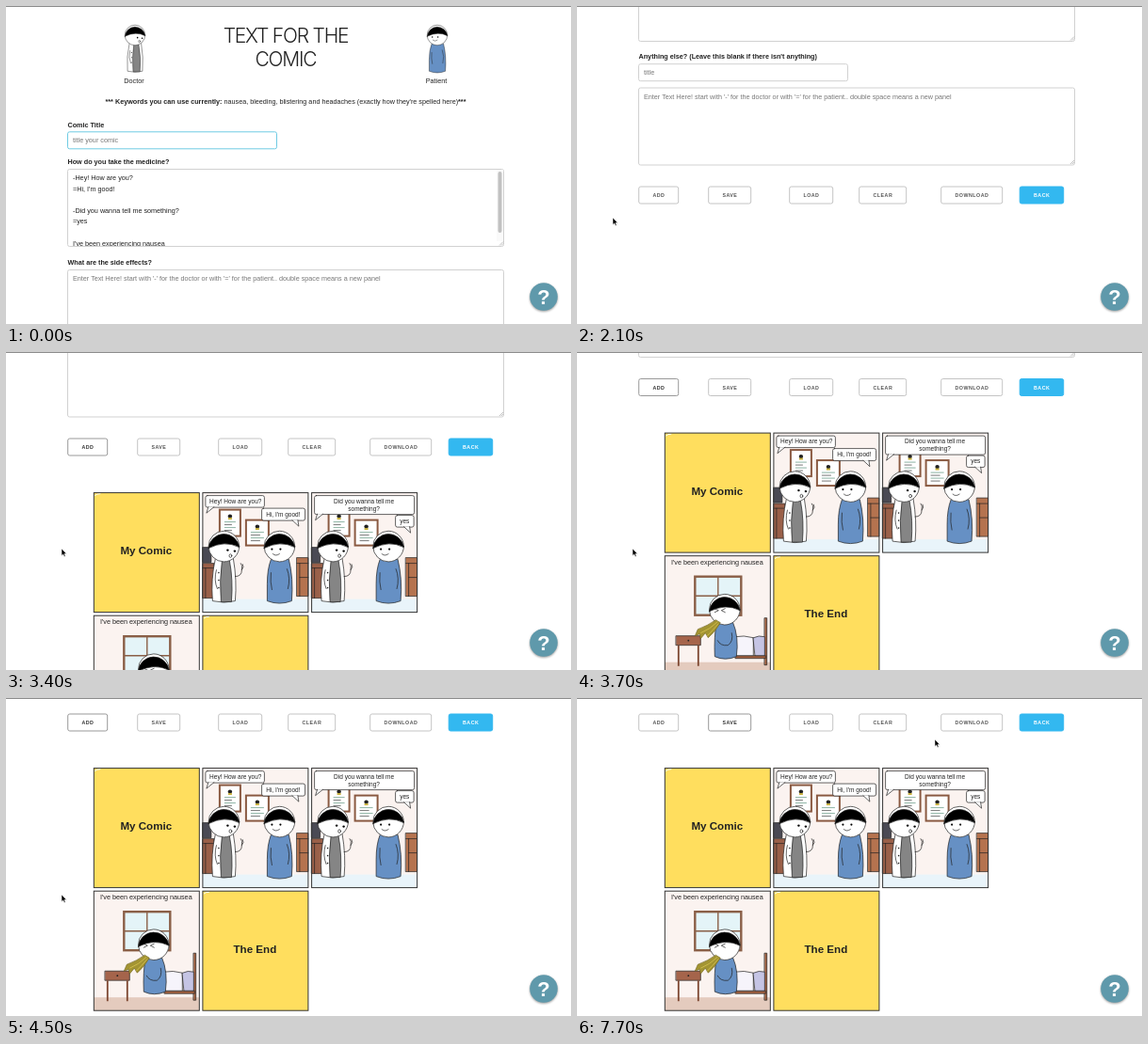
These frames come from a looping animation (600x338 px, 7.8 s). An HTML page:

```html
<!DOCTYPE html>
<html>
<head>
<meta charset="utf-8">
<style>
html, body { margin: 0; width: 100%; height: 100%; overflow: hidden; background: #fff; }
svg { display: block; font: 7.22px "Liberation Sans", Arial, sans-serif; fill: #222; }
text { white-space: pre; }
.b { font-weight: 700; }
.m { text-anchor: middle; }
.say { font-size: 6.5px; }
.hint { fill: #777; }
.box { fill: #fff; stroke: #d1d1d1; }
.btn { font-size: 5.3px; font-weight: 700; letter-spacing: .5px; text-anchor: middle; fill: #555; }
.btn rect { fill: #fff; stroke: #c4c4c4; }
.btn.on { fill: #333; }
.btn.on rect { stroke: #999; }
.btn.main { fill: #fff; }
.btn.main rect { fill: #33b8f0; stroke: #33b8f0; }
.big { font-size: 11.6px; font-weight: 700; text-anchor: middle; }
.ink { stroke: #222; stroke-width: .7; stroke-linejoin: round; stroke-linecap: round; }
.ui { font-family: Inter, Roboto, sans-serif; }
</style>
</head>
<body>
<svg id="stage" width="600" height="338" viewBox="0 0 600 338"></svg>
<script>
const text = (x, y, s, cls = '', extra = '') => `<text x="${x}" y="${y}" class="${cls}" ${extra}>${s}</text>`;
const rect = (x, y, w, h, fill, extra = '') =>
  `<rect x="${x}" y="${y}" width="${w}" height="${h}" fill="${fill}" ${extra}/>`;
const path = (d, fill = 'none', extra = 'class="ink"') => `<path d="${d}" fill="${fill}" ${extra}/>`;
const dot = (x, y, r, fill, extra = '') => `<circle cx="${x}" cy="${y}" r="${r}" fill="${fill}" ${extra}/>`;
const group = (x, y, s, extra = '') => `<g transform="translate(${x} ${y}) ${extra}">${s}</g>`;

// Form controls
const HINT = "Enter Text Here! start with '-' for the doctor or with '=' for the patient.. double space means a new panel";
const field = (y, h, extra = '', w = 222) => rect(65.5, y, w, h, '#fff', `rx="2" class="box" ${extra}`);
const area = (y, inner) => field(y, 82, '', 463) + inner +
  path(`M524,${y + 81}l4,-4M526,${y + 81}l2,-2`, 'none', 'stroke="#999" stroke-width=".6"');
const button = (id, x, w, label, cls = '') =>
  `<g id="${id}" class="btn ${cls}">${rect(x, 517, w, 18, '#fff', 'rx="2"')}${text(x + w / 2 + .2, 528, label)}</g>`;

// Characters, with the head centre at 0,0
const hair = path('M-16.3,2A16.4,16.4 0 0 1 16.3,1Q1,-7 -16.3,2Z', '#000');
const head = dot(0, 0, 16.3, '#fff', 'class="ink"');
const doctor = arm =>
  path('M-9,13Q-14,34 -12,58Q0,61 12,58Q14,36 10,13Z', '#fff') +
  path('M-2,15Q-5,36 -3,59L8,59Q10,36 6,15Z', '#858585') +
  path('M-8,25Q-11,36 -7,45') +
  [28, 36, 44].map(y => dot(-5.5, y, .8, '#222')).join('') +
  (arm ? path('M12,32Q19,32 19,25Q20,20 18,18M19,25Q22,22 20,19') : '') +
  head + hair + dot(4, 4, 1.2, '#000') + dot(11.5, 5, 1.2, '#000') +
  `<ellipse cx="7" cy="10" rx="1.4" ry="1.8" fill="#fff" class="ink"/>`;
const patient =
  path('M-9,14Q-13,24 -13,40L-13,58Q0,63 13,58Q15,34 10,14Z', '#6690c4') +
  path('M8,24Q12,34 9,45M-9,28Q-10,38 -8,46') +
  head + hair + dot(-8, 3, 1.1, '#000') + dot(1, 3, 1.1, '#000') + path('M-7,8Q-4,11 0,8');

// Comic panels, 112 x 127 each
const panel = (x, y, inner) => group(x, y,
  inner + rect(0, 0, 112, 127, 'none', 'stroke="#333"'));
const card = (x, y, s) => panel(x, y, rect(0, 0, 112, 127, '#ffde5e') +
  path('M1,3Q3,1 7,1', 'none', 'stroke="#fff" stroke-width="1"') + text(55.5, 65.6, s, 'big'));
const poster = (x, y, w, h) =>
  rect(x, y, w, h, '#fff', 'stroke="#8a5a42" stroke-width="2"') +
  [0, 1, 2, 3].map(i => path(`M${x + 5},${y + 13 + i * 3}h${w - 10 - i % 2 * 4}`, 'none',
    `stroke="${i % 2 ? '#555' : '#6f9f8c'}" stroke-width=".8"`)).join('') +
  dot(x + w / 2, y + 7, 2.2, '#222') + rect(x + w / 2 - 2, y + 8.5, 4, 2, '#c9b23c');
const office =
  rect(0, 0, 112, 127, '#fbf3f0') + rect(0, 113, 112, 14, '#e9f4fa') +
  rect(0, 58, 9, 16, '#4a4a54', 'class="ink"') + rect(0, 75, 12, 37, '#9a6049', 'class="ink"') +
  path('M0,80H12M3,80V112') +
  rect(100, 69, 12, 41, '#b5734f', 'class="ink"') + path('M100,75H112M103,75V110M103,90H112') +
  poster(18, 18, 22, 28) + poster(46, 29, 24, 27) +
  group(22.5, 57, doctor(true)) + group(81.5, 57, patient);
const bubble = (x, y, w, h, tail) =>
  rect(x, y, w, h, '#fff', 'rx="2" class="ink"') +
  path(`M${tail},${y + h - .4}l${tail < 50 ? '-2,6.5 8' : '7,6.5 -1'},-6.5`, '#fff');
const bedroom =
  rect(0, 0, 112, 127, '#fbf3f0') + rect(0, 113, 112, 14, '#e4cbbe') +
  rect(32, 22, 49, 41, '#e4f4f8', 'stroke="#8a5f47" stroke-width="2.4"') +
  path('M56.5,22V63M32,42.5H81', 'none', 'stroke="#8a5f47" stroke-width="1.4"') +
  rect(106, 66, 2.4, 50, '#a2603f', 'class="ink"') + rect(75, 106, 32, 3, '#a2603f', 'class="ink"') +
  path('M74,86Q84,84 94,87V106H74Z', '#f6f4fb') +
  path('M94,87Q100,84 106,86V106H96Z', '#c5c4e4') +
  rect(12, 85, 26, 10, '#a5644b', 'class="ink"') +
  path('M14.5,95V117M35.5,95V117', 'none', 'stroke="#7d4630" stroke-width="1.8"') + dot(25, 90, .9, '#222') +
  path('M55,70Q52,86 53,107Q64,112 76,107Q79,86 72,70Z', '#6690c4') +
  path('M71,82Q73,91 67,95Q59,96 56,90') +
  group(63.5, 57, head + hair) +
  path('M53,56l4,2l-4,2M64,56l-4,2l4,2') +
  path('M54,68Q46,74 35,78L32,85L37,83L38,88L43,82L46,87Q54,80 59,71Z', '#a39432', 'stroke="#6d6420" stroke-width=".6"') +
  path('M56,70Q48,78 38,82M57,72Q50,80 45,85', 'none', 'stroke="#cdb94a" stroke-width="1"') +
  text(55.5, 9.3, "I've been experiencing nausea", 'm');

const comic =
  card(93.3, 574.6, 'My Comic') +
  panel(208.9, 574.6, office +
    bubble(3, 3, 62.5, 12.5, 6) + text(7.2, 11.4, 'Hey! How are you?', 'say') +
    bubble(62.7, 16.5, 46, 13, 95) + text(67.3, 25, "Hi, I'm good!", 'say')) +
  panel(324.6, 574.6, office +
    bubble(3, 3, 106, 20, 6) + text(55.5, 11.2, 'Did you wanna tell me', 'm say') + text(55.5, 19.4, 'something?', 'm say') +
    bubble(89, 24, 19.5, 12.5, 98) + text(98.7, 32.4, 'yes', 'm say')) +
  panel(93.3, 705.2, bedroom) +
  card(208.9, 705.2, 'The End');

const lines = ['-Hey! How are you?', "=Hi, I'm good!", '', '-Did you wanna tell me something?', '=yes', '', "I've been experiencing nausea"];
const heading = 'class="ui m" font-size="21" font-weight="300" letter-spacing="-1.2"';
const page =
  group(137, 31, doctor(false), 'scale(.66)') + text(136, 82, 'Doctor', 'm') +
  group(458, 31, patient, 'scale(.66)') + text(457, 82, 'Patient', 'm') +
  `<text x="297" y="38.5" ${heading}>TEXT FOR THE</text><text x="297" y="63.7" ${heading}>COMIC</text>` +
  text(297, 104, '<tspan class="b">*** Keywords you can use currently:</tspan> nausea, bleeding, blistering and headaches (exactly how they\'re spelled here)<tspan class="b">***</tspan>', 'm') +
  text(65.5, 128.5, 'Comic Title', 'b') + field(133.8, 18, 'style="stroke:#6fcbe3"') + text(71, 145.3, '', '', 'id="title"') +
  text(65.5, 168, 'How do you take the medicine?', 'b') +
  area(173.5, `<clipPath id="clip">${rect(66, 174, 462, 81, '#000')}</clipPath><g clip-path="url(#clip)">` +
    lines.map((s, i) => text(71, 185 + i * 11.6, s)).join('') + '</g>' +
    rect(521, 174, 7, 76, '#fafafa') + rect(522.5, 176, 4, 65, '#c1c1c1', 'rx="2"')) +
  text(65.5, 274.7, 'What are the side effects?', 'b') + area(280.5, text(71, 291.7, HINT, 'hint')) +
  text(65.5, 381, "Anything else? (Leave this blank if there isn't anything)", 'b') +
  field(386.7, 18) + text(71, 398, 'title', 'hint') +
  area(412, text(71, 423.5, HINT, 'hint')) +
  button('add', 65.7, 42, 'ADD') + button('save', 139.7, 45, 'SAVE') + button('load', 225.7, 46, 'LOAD') +
  button('clear', 299.7, 50, 'CLEAR') + button('download', 386.7, 65, 'DOWNLOAD') + button('back', 470.2, 46.5, 'BACK', 'main') +
  `<g id="comic">${comic}</g>`;

const help = dot(571, 309, 14.8, '#5f99ab', 'style="filter:drop-shadow(.5px 1px 1px #0006)"') +
  text(571, 316.8, '?', 'b m', 'font-size="22" style="fill:#fff"');
const dialog = `<g id="dialog" class="ui">` +
  rect(192.5, -4, 216, 63, '#fff', 'rx="2" style="filter:drop-shadow(0 1px 2px #0004)"') +
  text(200, 13.8, 'This page says', '', 'font-size="7.2"') +
  text(200, 27.5, 'Your comic was saved!', 'hint', 'font-size="6.4"') +
  rect(370, 37.7, 31, 13.3, '#4285f4', 'rx="1.5"') +
  text(385.5, 46.6, 'OK', 'm', 'font-size="6.2" font-weight="500" style="fill:#fff"') + '</g>';
const arrow = path('M0,0V7.4L1.7,5.9L2.9,8.5L4.1,8L3,5.4H5.2Z', '#000', 'id="arrow" stroke="#fff" stroke-width=".5"');
const hand = path('M-.8,.5Q0,-.6 .8,.5V3L3.6,3.8Q4.3,5 3.2,8.3H-.7L-3,5.2Q-2.4,4.2 -.8,5.4Z', '#fff',
  'id="hand" stroke="#000" stroke-width=".7"');

const $ = id => document.getElementById(id);
$('stage').innerHTML = `<g id="page">${page}</g>` + help + dialog +
  rect(0, 0, 600, 1, '#8a8a8a') + `<g id="cursor">${arrow}${hand}</g>`;

// Motion: [time, value...] points joined by straight lines
const SCROLL = [[1000, 0], [1200, 50], [1600, 190], [2100, 325], [2400, 382], [3200, 382], [3400, 425], [3700, 488.5], [3900, 498], [4100, 500]];
const CURSOR = [[1000, 38, 225], [2400, 38, 225], [2800, 77.5, 144], [3000, 77.5, 144], [3200, 59, 209],
  [4500, 59, 209], [4800, 135, 60], [5000, 161, 26], [6500, 161, 26], [7100, 380, 44]];
function at(keys, t) {
  const i = keys.findIndex(k => k[0] > t);
  if (i === 0) return keys[0].slice(1);
  if (i < 0) return keys[keys.length - 1].slice(1);
  const a = keys[i - 1], b = keys[i], f = (t - a[0]) / (b[0] - a[0]);
  return a.slice(1).map((v, j) => v + (b[j + 1] - v) * f);
}
const show = (id, on) => $(id).style.display = on ? '' : 'none';
const within = (t, a, b) => t >= a && t < b;

function draw(now) {
  const t = Math.floor(now % 7800 / 100) * 100;
  const typed = 'My Comic'.slice(0, t / 100);
  $('title').textContent = typed || 'title your comic';
  $('title').setAttribute('class', typed ? '' : 'hint');
  $('page').setAttribute('transform', `translate(0 ${-at(SCROLL, t)[0]})`);
  $('cursor').setAttribute('transform', `translate(${at(CURSOR, t)})`);
  const pointing = within(t, 2800, 3100) || within(t, 5000, 5400);
  show('cursor', t >= 1000);
  show('hand', pointing);
  show('arrow', !pointing);
  show('comic', t >= 2900);
  show('dialog', within(t, 5400, 7400));
  $('add').classList.toggle('on', within(t, 2800, 5300));
  $('save').classList.toggle('on', t >= 5000);
  requestAnimationFrame(draw);
}
draw(0);
</script>
</body>
</html>
```
